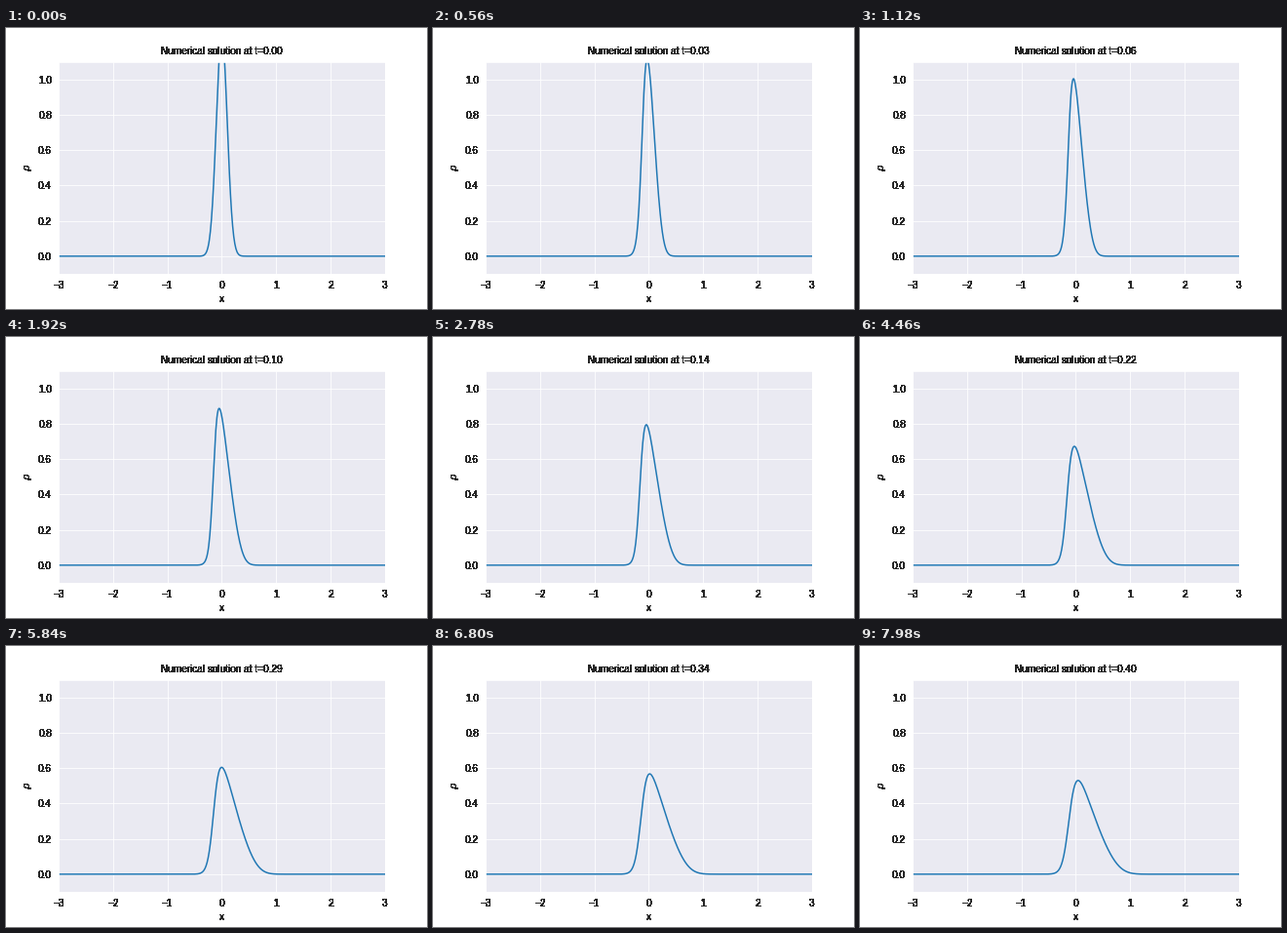
Animation, 432 px wide and 288 px high, one loop 8000 ms. Source, as a matplotlib script:

```python
import math

import numpy as np
import matplotlib.pyplot as plt
from matplotlib.animation import FuncAnimation

FRAMES = 400
INTERVAL = 20          # ms
DT = 0.001             # model time per frame
DIFF = 0.05            # diffusion constant
SIGMA = 0.1            # width of the initial bump
INK = 0.15

plt.rcParams.update({
    "font.family": "Liberation Sans",
    "font.size": 10,
    "text.color": str(INK),
    "axes.labelcolor": str(INK),
    "xtick.color": str(INK),
    "ytick.color": str(INK),
    "axes.facecolor": "#EAEAF2",
    "axes.edgecolor": "white",
    "axes.linewidth": 0.8,
    "axes.axisbelow": True,
    "grid.color": "white",
    "grid.linewidth": 0.8,
})

x = np.linspace(-3, 3, 601)

# Initial density and its Cole-Hopf transform on a fine grid
fine = np.linspace(-6, 6, 4801)
rho0 = np.exp(-fine**2 / (2 * SIGMA**2)) / math.sqrt(2 * math.pi * SIGMA)
cdf = np.array([0.5 * (1 + math.erf(v / (SIGMA * math.sqrt(2)))) for v in fine])
mass = math.sqrt(SIGMA)
phi0 = np.exp(mass * cdf / DIFF)

nodes = np.linspace(-7, 7, 113)
weights = np.exp(-nodes**2 / 2)


def density(t):
    """Exact solution of rho_t + (rho (1 - rho))_x = DIFF rho_xx."""
    spread = math.sqrt(2 * DIFF * t)
    points = (x - t)[:, None] + spread * nodes[None, :]
    top = np.interp(points, fine, rho0 * phi0) @ weights
    return top / (np.interp(points, fine, phi0) @ weights)


def harden(image, dpi):
    """Turn soft glyph edges into solid ink."""
    out = np.empty_like(image)
    out[..., :3] = INK
    out[..., 3] = image[..., 3] > 0.03
    return out, 0, 0


fig = plt.figure(figsize=(6, 4), dpi=72, facecolor="white")
ax = fig.add_axes([0.125, 0.125, 0.775, 0.755])
ax.set_xlim(-3, 3)
ax.set_ylim(-0.1, 1.1)
ax.set_xticks(range(-3, 4))
ax.set_yticks([k / 5 for k in range(6)])
ax.tick_params(length=0, pad=7)
ax.grid(True)
ax.set_xlabel("x")
ax.set_ylabel(r"$\rho$")
title = ax.set_title("", fontsize=10, pad=7.5)
line, = ax.plot(x, density(0), color="#1f77b4", linewidth=1.5)

for text in [title, ax.xaxis.label, ax.yaxis.label,
             *ax.get_xticklabels(), *ax.get_yticklabels()]:
    text.set_agg_filter(harden)


def update(i):
    t = i * DT
    line.set_ydata(density(t))
    title.set_text(f"Numerical solution at t={t:.2f}")
    return line, title


anim = FuncAnimation(fig, update, frames=FRAMES, interval=INTERVAL,
                     repeat=True, repeat_delay=0, blit=False)
plt.show()
```
